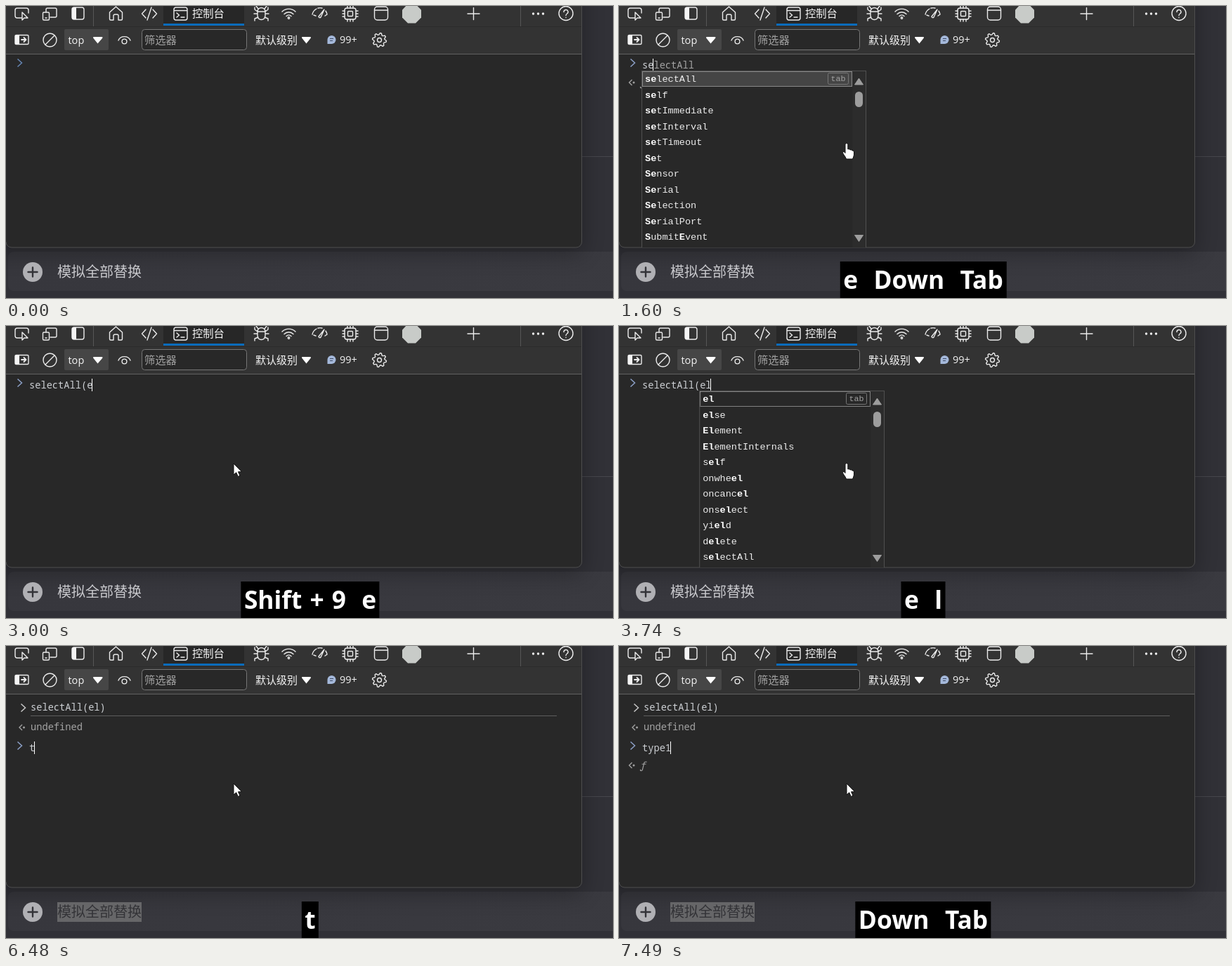
These frames come from a looping animation (864x416 px, 8000 ms). An HTML page:

```html
<!DOCTYPE html>
<html lang="zh">
<head>
<meta charset="utf-8">
<style>
html, body { margin: 0; width: 100%; height: 100%; overflow: hidden; background: #313137; }
#stage { position: relative; width: 864px; height: 416px; overflow: hidden; }
svg { position: absolute; left: 0; top: 0; }
text { white-space: pre; fill: #f4f4f4; }
.cjk { font-family: "Noto Sans CJK SC", "Noto Sans CJK", sans-serif; }
.ui { font-family: "Open Sans", "Noto Sans", sans-serif; font-size: 14.5px; }
.code text { font: 13.7px "Noto Sans Mono", monospace; fill: #cdd0d4; }
.code .menu { font: 13.55px "Liberation Mono", monospace; fill: #ececec; }
.code .tab { font: 11.7px "Liberation Mono", monospace; fill: #a3a3a3; }
.menu tspan { font-weight: bold; fill: #fff; }
.code .dim { fill: #a3a3a3; }
.line { fill: none; stroke: #ececec; stroke-width: 1.4; stroke-linecap: round; stroke-linejoin: round; }
#keys { position: absolute; left: 433px; top: 364px; height: 60px; padding: 0 4.5px; transform: translateX(-50%);
  background: #000; color: #fff; font: bold 35.3px/51px "Open Sans", "Noto Sans", sans-serif;
  white-space: pre; word-spacing: 2px; }
</style>
</head>
<body>
<div id="stage">
<svg width="864" height="416" viewBox="0 0 864 416">
  <defs>
    <linearGradient id="bar"><stop stop-color="#37373d"/><stop offset="1" stop-color="#3a3a40"/></linearGradient>
    <clipPath id="panel"><path d="M0 0H819V336a8 8 0 0 1-8 8H8a8 8 0 0 1-8-8Z"/></clipPath>
    <filter id="blur" x="-20%" y="-20%" width="140%" height="140%"><feGaussianBlur stdDeviation="16"/></filter>
  </defs>
  <rect width="864" height="416" fill="#313137"/>
  <path d="M820 214.5H864" stroke="#46464c"/>
  <rect x="3" y="350" width="880" height="56" rx="8" fill="url(#bar)"/>
  <rect x="-40" y="-40" width="860" height="392" fill="#000" opacity=".3" filter="url(#blur)"/>
  <circle cx="38" cy="379" r="14" fill="#b0b0b4"/>
  <path d="M31.5 379H44.5M38 372.5V385.5" stroke="#333338" stroke-width="2.4" stroke-linecap="round"/>
  <rect id="sel" x="73" y="365" width="120" height="28" fill="#666668"/>
  <text id="label" class="cjk" x="73" y="385.5" font-size="20" font-weight="300">模拟全部替换</text>

  <g clip-path="url(#panel)">
    <rect width="820" height="345" fill="#282828"/>
    <rect width="820" height="68" fill="#333"/>
    <path d="M0 29.5H820" stroke="#2b2b2b"/>
    <rect x="224" width="115" height="25" fill="#272727"/>
    <rect x="224" y="25" width="115" height="3" fill="#0a6cbc"/>
    <path d="M124.5 0V29M732.5 0V29" stroke="#565656"/>
    <path d="M0 68.5H820" stroke="#626262"/>
  </g>
  <path d="M819.5 0V336a8 8 0 0 1-8 8H8a8 8 0 0 1-8-8" fill="none" stroke="#4e4e4e"/>

  <g class="line">
    <path d="M22 17H16a3 3 0 0 1-3-3V6a3 3 0 0 1 3-3H29a3 3 0 0 1 3 3V10M23 9V20L26 17H31Z"/>
    <path d="M57 8V5a2 2 0 0 1 2-2H70a2 2 0 0 1 2 2V14a2 2 0 0 1-2 2H66M63 16H66M54 9H60a1.5 1.5 0 0 1 1.5 1.5V18.5a1.5 1.5 0 0 1-1.5 1.5H54a1.5 1.5 0 0 1-1.5-1.5V10.5A1.5 1.5 0 0 1 54 9ZM56 17H58"/>
    <rect x="94" y="2" width="17" height="17" rx="3"/>
    <path d="M147.5 9L156.5 1 165.500 9V18.5a1.5 1.5 0 0 1-1.5 1.5H160V14a2 2 0 0 0-2-2H155a2 2 0 0 0-2 2V20H149a1.5 1.5 0 0 1-1.5-1.5Z"/>
    <path d="M199 5L193.5 11 199 17M209 5L214.5 11 209 17M207 2L201 20"/>
    <path d="M242 2H255a3 3 0 0 1 3 3V17a3 3 0 0 1-3 3H242a3 3 0 0 1-3-3V5a3 3 0 0 1 3-3ZM239 6.5H258M243 10L246.5 13 243 16M249 16H254"/>
    <path d="M358 8a5.5 5.5 0 0 1 11 0V14a5.5 5.5 0 0 1-11 0ZM358 8H369M359 4L356 0M368 4L371 0M358 11H353M369 11H374M358 8L354 5V2M369 8L373 5V2M359 16L354 18V21M368 16L373 18V21"/>
    <path d="M393 8a13.5 13.5 0 0 1 19 0M396 11.5a9 9 0 0 1 13 0M399 14.5a5 5 0 0 1 7 0"/>
    <circle cx="402.5" cy="17" r="1.2"/>
    <path d="M436 12a12 12 0 0 1 6-8M457 12a12 12 0 0 0-2-5M444 3a12 12 0 0 1 6 0M438 13L441 14M454 14L457 12M445 15L453 5 448 16a1.7 1.7 0 0 1-3-1"/>
    <rect x="482" y="3" width="16" height="16" rx="3"/><rect x="486.5" y="7.5" width="7" height="7" rx="1"/>
    <path d="M486 3V0M490 3V0M494 3V0M486 19V22M490 19V22M494 19V22M482 7H479M482 11H479M482 15H479M498 7H501M498 11H501M498 15H501"/>
    <rect x="524.5" y="1" width="19" height="19" rx="4"/><path d="M524.5 6H543.5"/>
    <path d="M657 11H674M665.5 2.5V19.5"/>
    <circle cx="797" cy="10.5" r="10"/>
    <path d="M794 8.5a3 3 0 1 1 4.5 2.5Q797 12 797 13.5M797 16.3V16.5"/>
    <rect x="13" y="41.5" width="19" height="13" rx="1.5"/>
    <path d="M22 48H28M25.5 45L28.5 48 25.5 51" stroke-width="1.8"/>
    <circle cx="62.5" cy="48.5" r="9.5"/><path d="M56 55L69 42"/>
    <path d="M160 49a9 8 0 0 1 17 0"/><circle cx="168.5" cy="50.5" r="3.4"/>
    <circle cx="531.5" cy="48.5" r="3"/><path id="gear"/>
  </g>
  <path d="M94 4a2 2 0 0 1 2-2H100V19H96a2 2 0 0 1-2-2ZM13 42H19V54H13Z" fill="#f4f4f4"/>
  <path d="M571.5-2.5H583L591 5.5V16.5L583 24.5H572L564 16.5V5.5Z" fill="#c8cbc8"/>
  <g fill="#f4f4f4"><circle cx="750.5" cy="11" r="1.7"/><circle cx="757.5" cy="11" r="1.7"/><circle cx="764.5" cy="11" r="1.7"/></g>
  <rect x="83" y="33" width="63" height="30" rx="2" fill="#464646"/>
  <path d="M125 44H136.5a1 1 0 0 1 .7 1.7L130.500 53.5 124.3 45.7A1 1 0 0 1 125 44ZM422 44H433a1 1 0 0 1 .7 1.7L427.5 53.5 421.3 45.7A1 1 0 0 1 422 44Z" fill="#fff"/>
  <rect x="193.5" y="33.5" width="149" height="29" rx="4" fill="#282828" stroke="#767676"/>
  <path d="M457.5 54V48a6 6 0 1 1 6 6Z" fill="#a4b8da"/>
  <path d="M461 46.5H466M461 49.5H465" stroke="#3c4a66"/>
  <g class="cjk" font-size="15.3">
    <text x="265" y="16">控制台</text>
    <text x="197" y="54" style="fill:#a2a2a2">筛选器</text>
    <text x="355" y="53.5" font-size="15">默认级别</text>
  </g>
  <g class="ui"><text x="88.5" y="53.5">top</text><text x="475" y="53">99+</text></g>
  <g id="live" class="code" clip-path="url(#panel)"></g>
  <g id="hint" class="code">
    <rect x="105.5" y="44.5" width="32" height="27" rx="3" fill="#333" stroke="#555"/>
    <text x="113" y="62">el</text>
  </g>
  <g id="mouse" fill="#fff" stroke="#111">
    <path id="arrow" d="M0 0V16L3.7 12.7 6.3 18.5 9 17.3 6.5 11.7H11.5Z"/>
    <path id="hand" d="M-2 1.5A1.9 1.9 0 0 1 1.8 1.5V8Q4.5 7 5 9Q7.5 8 8 10Q10.5 9.5 10.5 12V16Q10 19 8.5 22H-0.5Q-1.5 19 -4 16Q-6.500 12.5 -5 11.5Q-3.5 11 -2 13.5Z"/>
  </g>
</svg>
<div id="keys"></div>
</div>
<script>
const $ = id => document.getElementById(id);
const LOOP = 8000, CH = 8.22;

// Suggestions: letters between stars are matched.
const menu = (col, right, words) => ({ col, right, words: words.split(" ") });
const menus = {
  s: menu(0, 351.5, "*s*electAll *s*elf *s*creen *s*croll *s*tatus *s*top *S*et *S*ensor *s*witch *S*tring *S*ymbol"),
  se: menu(0, 351.5, "*se*lectAll *se*lf *se*tImmediate *se*tInterval *se*tTimeout *Se*t *Se*nsor *Se*rial *Se*lection *Se*rialPort *S*ubmit*E*vent"),
  e: menu(10, 377.5, "*e*l *e*lse *e*val *e*vent *e*scape *e*xport *E*rror *E*vent *E*lement *e*xternal *E*valError"),
  el: menu(10, 377.5, "*el* *el*se *El*ement *El*ementInternals s*el*f onwhe*el* oncanc*el* ons*el*ect yi*el*d d*el*ete s*el*ectAll"),
  t: menu(0, 647.5, "*t*ype1 *t*his *t*op *t*hrow *t*rue *t*ry *t*ypeof *t*oString"),
  ty: menu(0, 647.5, "*ty*pe1 *ty*peof *Ty*peError in*t*anceT*y*pe MimeT*y*pe S*ty*leSheet S*ty*leSheetList s*ty*leMedia")
};

// Each step changes only the listed properties.
const steps = [
  [0, { input: "", ghost: "", caret: 0, keys: "", pop: "", pick: 0, result: 0, echo: 0, hint: 0, sel: 0 }],
  [460, { caret: 1 }],
  [720, { input: "s", keys: "s" }],
  [790, { pop: "s" }],
  [920, { input: "se", keys: "s  e" }],
  [990, { pop: "se", result: 1 }],
  [1400, { keys: "s  e  Down" }],
  [1460, { pick: 1, ghost: "lectAll" }],
  [1600, { keys: "e  Down  Tab" }],
  [1660, { input: "selectAll", ghost: "", pop: "", pick: 0 }],
  [1800, { keys: "Down  Tab" }],
  [2270, { keys: "Tab", caret: 0 }],
  [2400, { input: "selectAll(", keys: "Tab  Shift + 9", caret: 1, result: 0 }],
  [2540, { keys: "Shift + 9", hint: 1 }],
  [3000, { input: "selectAll(e", keys: "Shift + 9  e", hint: 0 }],
  [3140, { pop: "e" }],
  [3340, { keys: "e" }],
  [3610, { input: "selectAll(el", keys: "e  l" }],
  [3680, { pop: "el" }],
  [3870, { keys: "l" }],
  [4080, { input: "selectAll(el)", keys: "Shift + 0", pop: "" }],
  [4670, { input: "", keys: "Shift + 0  Enter", sel: 1 }],
  [4770, { echo: 1 }],
  [5080, { keys: "Enter" }],
  [5340, { caret: 0 }],
  [5610, { keys: "" }],
  [5940, { caret: 1 }],
  [6480, { input: "t", keys: "t" }],
  [6550, { pop: "t" }],
  [6610, { input: "ty", keys: "t  y" }],
  [6680, { pop: "ty", result: 1 }],
  [7150, { keys: "t  y  Down" }],
  [7220, { pick: 1, ghost: "pe1" }],
  [7420, { keys: "Down  Tab" }],
  [7490, { input: "type1", pop: "", pick: 0, ghost: "" }]
];

const text = (x, y, s, cls = "") => `<text x="${x}" y="${y}" class="${cls}">${s}</text>`;
const rect = (x, y, w, h, attrs) => `<rect x="${x}" y="${y}" width="${w}" height="${h}" ${attrs}/>`;
const chevron = (x, y, color) =>
  `<path d="M${x} ${y - 5.5}l6 5.5-6 5.5" fill="none" stroke="${color}" stroke-width="1.5"/>`;
const reply = (x, y) =>
  `<path d="M${x + 4} ${y - 4}l-4 4 4 4" fill="none" stroke="#a0a0a0" stroke-width="1.4"/>
   <circle cx="${x + 6.5}" cy="${y}" r="1.5" fill="#a0a0a0"/>`;

function drawMenu({ col, right, words }, top, pick) {
  const x = 32.5 + col * CH, bar = right - 19, mid = right - 10;
  let out = rect(x, top, right - x, 270, 'fill="#282828" stroke="#505050"')
    + rect(bar, top + .5, 18.5, 270, 'fill="#2c2c2c"')
    + rect(x + 1, top + 1, bar - x - 2, 21, `fill="${pick ? "#454545" : "none"}" stroke="#ddd" stroke-dasharray="1 1"`)
    + rect(bar - 35, top + 3, 29, 16, 'rx="2" fill="none" stroke="#777"')
    + text(bar - 31, top + 14.5, "tab", "tab")
    + rect(mid - 5.5, top + 29.5, 11, 22, 'rx="5.5" fill="#9d9d9d"')
    + `<path d="M${mid} ${top + 10.5}l6 9h-12ZM${mid} 335.500l6-9h-12Z" fill="#9d9d9d" stroke="#9d9d9d" stroke-linejoin="round"/>`;
  words.forEach((w, i) => {
    out += text(x + 4.5, top + 15.8 + i * 22.5, w.replace(/\*(.+?)\*/g, "<tspan>$1</tspan>"), "menu");
  });
  return out;
}

function drawConsole(s) {
  const dy = s.echo ? 61 : 0, end = 33 + s.input.length * CH;
  let out = "";
  if (s.echo)
    out += chevron(21.5, 88, "#c8c8c8") + text(35, 92, "selectAll(el)")
      + rect(35, 99, 749, 1, 'fill="#5e5e5e"') + reply(19, 116) + text(35, 120, "undefined", "dim");
  out += chevron(16.5, 81 + dy, s.caret || s.input ? "#8b9fc6" : "#6686b4") + text(33, 89 + dy, s.input);
  if (s.ghost) out += text(end, 89 + dy, s.ghost, "dim");
  if (s.caret) out += rect(Math.floor(end - .8), 75 + dy, 1, 18, 'fill="#fff"');
  if (s.result) out += reply(14.5, 109 + dy) + text(29.5, 114 + dy, "<tspan font-style='italic'>ƒ</tspan>", "dim");
  if (s.pop) out += drawMenu(menus[s.pop], 92.5 + dy, s.pick);
  return out;
}

const show = (id, on) => $(id).style.display = on ? "" : "none";
let last = "";

function frame(now) {
  const t = now % LOOP, s = {};
  for (const [at, change] of steps) if (t >= at) Object.assign(s, change);

  const p = Math.min(1, Math.max(0, (t - 130) / 330)), q = (1 - p) ** 2;
  $("mouse").setAttribute("transform", `translate(${324 + 457 * q} ${196 + 178 * q})`);
  show("mouse", t >= 130);

  const key = JSON.stringify(s);
  if (key !== last) {
    last = key;
    $("live").innerHTML = drawConsole(s);
    $("keys").textContent = s.keys;
    show("keys", s.keys);
    show("hint", s.hint);
    show("sel", s.sel);
    show("hand", s.pop);
    show("arrow", !s.pop);
    $("label").style.fill = s.sel ? "#333337" : "#c9c9cd";
  }
  requestAnimationFrame(frame);
}

const teeth = Array.from({ length: 32 }, (_, i) => {
  const a = (i + .5) * Math.PI / 16, r = i % 4 < 2 ? 10 : 7.6;
  return `${531.5 + r * Math.cos(a)} ${48.5 + r * Math.sin(a)}`;
});
$("gear").setAttribute("d", `M${teeth.join("L")}Z`);
requestAnimationFrame(frame);
</script>
</body>
</html>
```
